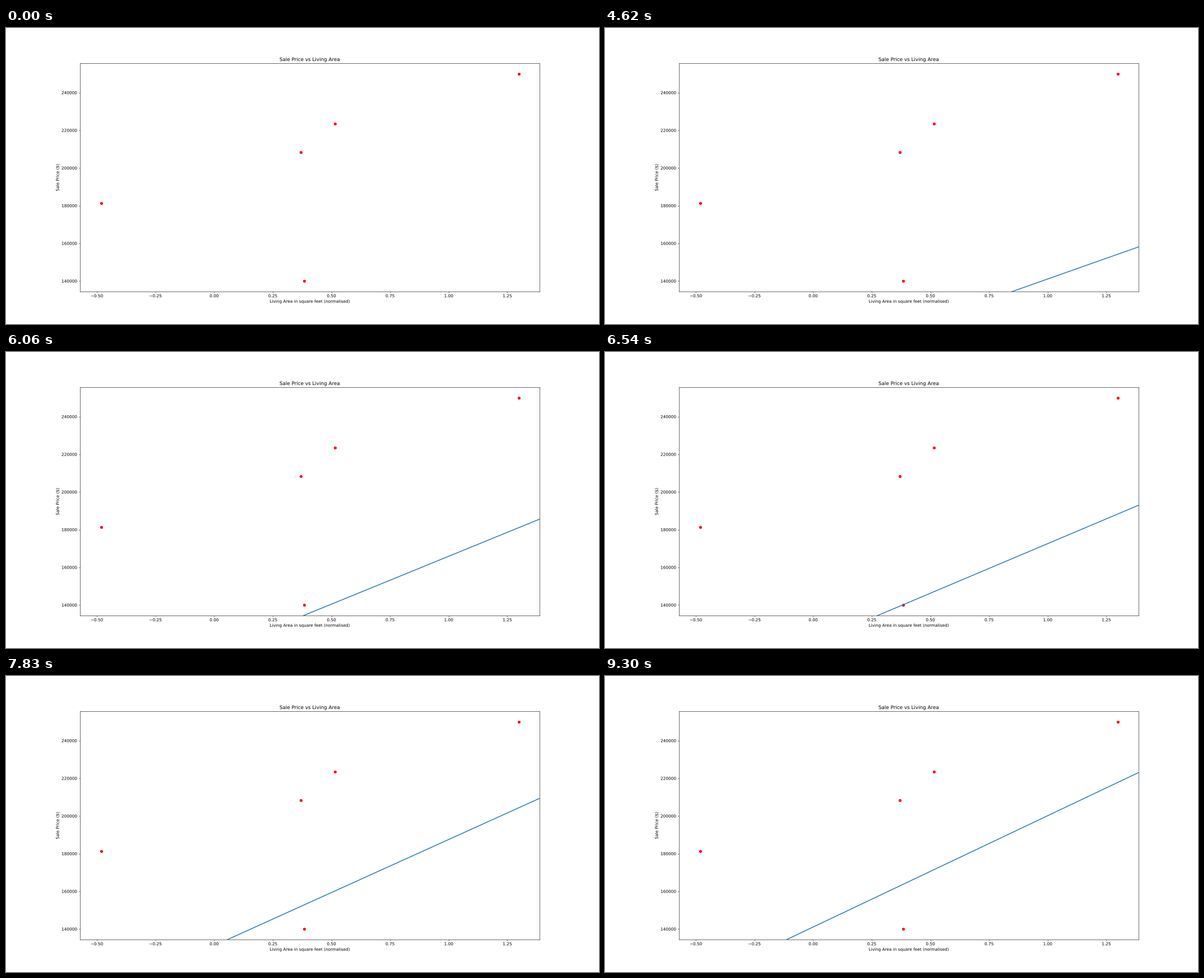
Recreate the animation shown at these times as a matplotlib script. Size 1058 px wide and 529 px high, loop 9.33 s.

```python
import numpy as np
import matplotlib.pyplot as plt
from matplotlib.animation import FuncAnimation
from matplotlib.patheffects import Normal

FRAMES, INTERVAL = 311, 30
HOLD = 10       # frames before the descent starts
RATE = 0.005    # learning rate

# Draw text and markers as smooth outlines, free of the pixel grid.
plt.rcParams["path.effects"] = [Normal()]
plt.rcParams["text.hinting"] = "none"

area = (np.array([1710, 1262, 1786, 1717, 2198]) - 1515.46) / 525.48
price = np.array([208500, 181500, 223500, 140000, 250000])


def descend(steps):
    """Intercept and slope after each step of gradient descent from zero."""
    design = np.column_stack([np.ones_like(area), area])
    theta = np.zeros(2)
    path = [theta]
    for _ in range(steps):
        error = price - design @ theta
        theta = theta + RATE * design.T @ error / len(area)
        path.append(theta)
    return np.array(path)


path = descend(FRAMES - HOLD)

fig, ax = plt.subplots(figsize=(20, 10), dpi=52.9)
ax.scatter(area, price, color="red")
ax.set_title("Sale Price vs Living Area")
ax.set_xlabel("Living Area in square feet (normalised)")
ax.set_ylabel("Sale Price ($)")
ax.set_xlim(ax.get_xlim())
ax.set_ylim(ax.get_ylim())

ends = np.array([-1.0, 2.0])
line, = ax.plot([], [], color="C0", lw=2)


def update(frame):
    intercept, slope = path[max(frame - HOLD, 0)]
    line.set_data(ends, intercept + slope * ends)
    return line,


anim = FuncAnimation(fig, update, frames=FRAMES, interval=INTERVAL,
                     init_func=lambda: update(0), blit=True,
                     repeat=True, repeat_delay=0)
plt.show()
```
